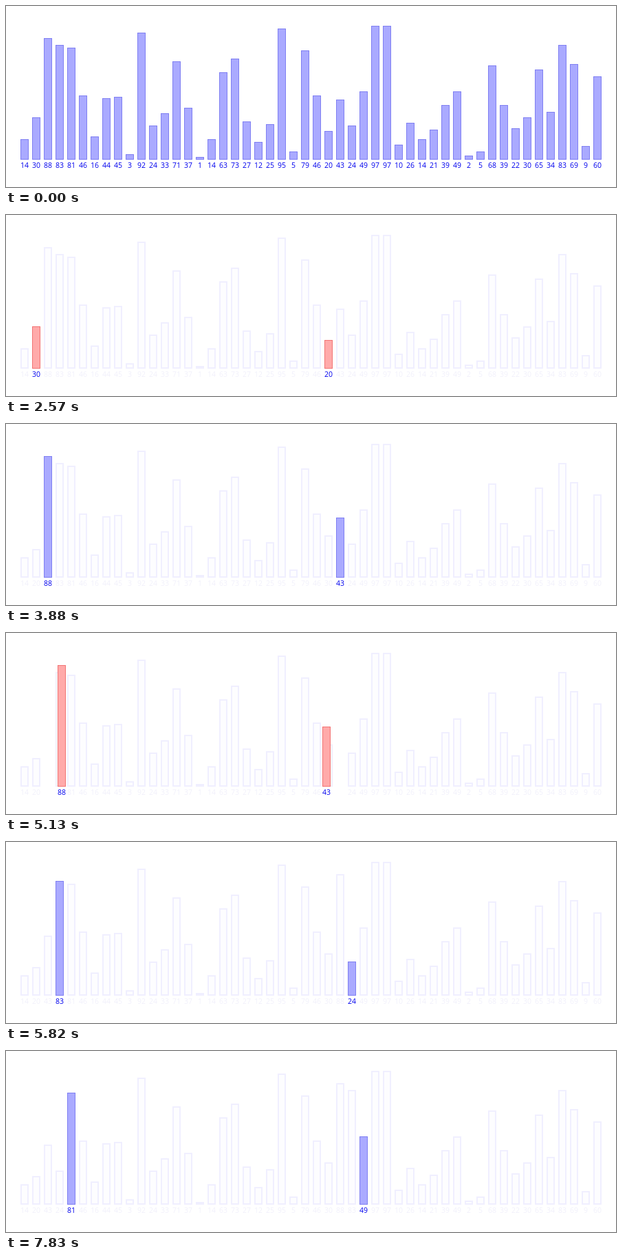
An HTML page with a canvas for the animation above (8 s loop, 887 by 265 pixels).

```html
<!DOCTYPE html>
<html lang="en">
<head>
<meta charset="utf-8">
<title>Shell sort</title>
<style>
  html, body { margin: 0; width: 100%; height: 100%; overflow: hidden; background: #fff; }
  canvas { display: block; width: 887px; height: 265px; }
</style>
</head>
<body>
<canvas id="stage" width="887" height="265"></canvas>
<script>
const ctx = document.getElementById('stage').getContext('2d');

const LOOP = 8000, GAP = 25, PITCH = 17, LEFT = 21, BAR = 12, BASE = 225;
const SWAP_STEPS = 21, STEP_MS = 30;

const START = [
  14, 30, 88, 83, 81, 46, 16, 44, 45, 3, 92, 24, 33, 71, 37, 1, 14, 63, 73, 27, 12, 25, 95, 5, 79,
  46, 20, 43, 24, 49, 97, 97, 10, 26, 14, 21, 39, 49, 2, 5, 68, 39, 22, 30, 65, 34, 83, 69, 9, 60
];

const BLUE = { fill: '#aaaaff', line: '#7f7ff2', text: '#0000ee' };
const RED = { fill: '#ffaaaa', line: '#f27474', text: '#0000ee' };
const GHOST = { fill: '#fdfdff', line: '#f0efff', text: '#f1f0fb', weight: 2 };

// Each round: when the pair is picked, when it is compared, and the swap if one follows.
const ROUNDS = [
  { pick: 500, compare: 1180 },
  { pick: 1890, compare: 2570, swap: 3190, ticks: [3250, 3370, 3520, 3640, 3760] },
  { pick: 3880, compare: 4500, swap: 5100, ticks: [5130, 5280, 5410, 5560, 5680] },
  { pick: 5820, compare: 6440, swap: 7100, ticks: [7220, 7340, 7460, 7590, 7710] },
  { pick: 7830, compare: Infinity }
];

const slotX = i => LEFT + PITCH * i;

function drawBar(x, value, style) {
  const weight = style.weight || 1;
  const height = 2 * value + 2;
  ctx.fillStyle = style.line;
  ctx.fillRect(x, BASE - height, BAR, height);
  if (height > 2 * weight) {
    ctx.fillStyle = style.fill;
    ctx.fillRect(x + weight, BASE - height + weight, BAR - 2 * weight, height - 2 * weight);
  }
}

function drawLabel(x, value, style) {
  ctx.fillStyle = style.text;
  ctx.fillText(value, x + BAR / 2, 237);
}

function drawItem(x, value, style) {
  drawBar(x, value, style);
  drawLabel(x, value, style);
}

function swapOffset(round, t) {
  const tick = (round.ticks || []).filter(at => at <= t).pop();
  if (tick === undefined) return 0;
  const step = Math.min(SWAP_STEPS, Math.round((tick - round.swap) / STEP_MS));
  return Math.round(GAP * PITCH * step / SWAP_STEPS);
}

function draw(t) {
  ctx.fillStyle = '#fff';
  ctx.fillRect(0, 0, 887, 265);
  ctx.font = '10.5px "Open Sans", "Noto Sans", sans-serif';
  ctx.textAlign = 'center';
  ctx.textBaseline = 'alphabetic';

  const now = ROUNDS.filter(r => r.pick <= t).length - 1;
  if (now < 0) {
    START.forEach((v, i) => drawItem(slotX(i), v, BLUE));
    return;
  }

  const values = START.slice();
  for (let i = 0; i < now; i++) {
    if (ROUNDS[i].ticks) [values[i], values[i + GAP]] = [values[i + GAP], values[i]];
  }

  values.forEach((v, i) => {
    if (i !== now && i !== now + GAP) drawItem(slotX(i), v, GHOST);
  });

  const round = ROUNDS[now];
  const style = t >= round.compare ? RED : BLUE;
  const offset = swapOffset(round, t);
  const pair = [
    [slotX(now) + offset, values[now]],
    [slotX(now + GAP) - offset, values[now + GAP]]
  ];
  for (const [x, v] of pair) {
    if (offset) {
      // a moving label hides the ones it passes over
      ctx.fillStyle = '#fff';
      ctx.fillRect(x - 3, 227, 18, 12);
    }
    drawItem(x, v, style);
  }
}

const begin = performance.now();
function frame() {
  draw((performance.now() - begin) % LOOP);
  requestAnimationFrame(frame);
}
frame();
</script>
</body>
</html>
```
